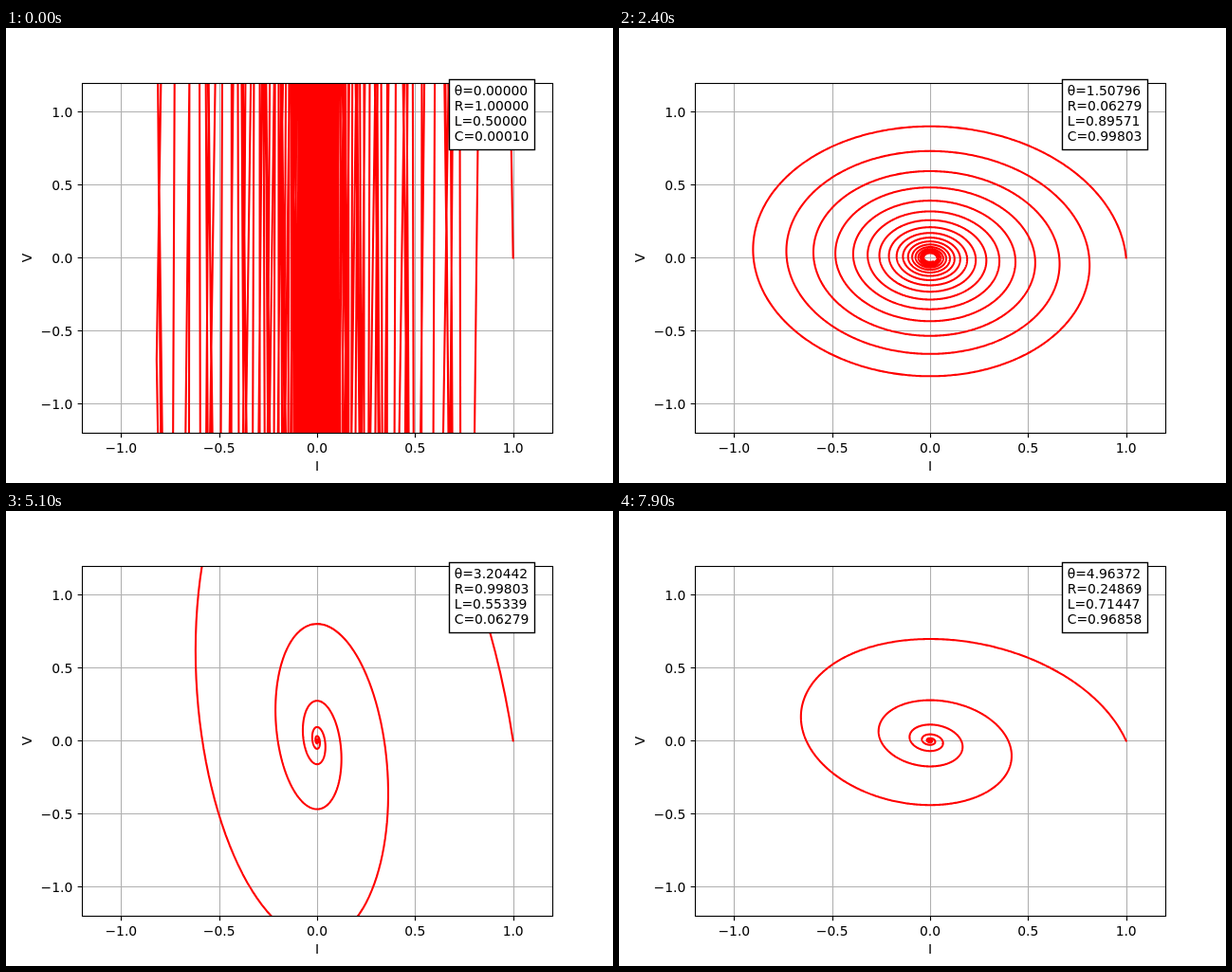
These frames come from a looping animation (640 px wide and 480 px high, 8000 ms). An HTML page:

```html
<!DOCTYPE html>
<html lang="en">
<head>
<meta charset="utf-8">
<title>RLC phase portrait</title>
<style>
  html, body { margin: 0; width: 100%; height: 100%; overflow: hidden; background: #fff; }
  svg { display: block; width: 640px; height: 480px; }
  text { font: 13.889px "DejaVu Sans", sans-serif; fill: #000; white-space: pre; }
  .grid { stroke: #b0b0b0; stroke-width: 1.11; }
  .axis { stroke: #000; stroke-width: 1.11; fill: none; }
  .curve { stroke: #f00; stroke-width: 2.083; fill: none; stroke-linejoin: round; stroke-linecap: square; }
  .box { stroke: #000; stroke-width: 1.39; fill: #fff; }
  .mid { text-anchor: middle; }
  .end { text-anchor: end; }
</style>
</head>
<body>
<svg viewBox="0 0 640 480">
  <clipPath id="plot"><rect x="80" y="58" width="496" height="369"/></clipPath>
  <g id="grid"></g>
  <path id="curve" class="curve" clip-path="url(#plot)"/>
  <g id="axes"><rect class="axis" x="80.5" y="58.5" width="496" height="369"/></g>
  <text class="mid" x="328" y="467">I</text>
  <text class="mid" transform="translate(27 242.4) rotate(-90)">V</text>
  <rect class="box" x="467.5" y="54.5" width="90" height="74"/>
  <g id="info"></g>
</svg>
<script>
const STEP_MS = 100, STEPS = 80;
const SAMPLES = 10000, DT = 100 / (SAMPLES - 1);
const MIN_MOVE = 0.25;

const $ = id => document.getElementById(id);
const px = i => 328 + i * 496 / 2.4;
const py = v => 242.4 - v * 369.6 / 2.4;

function add(parent, tag, attrs, text = '') {
  const el = document.createElementNS('http://www.w3.org/2000/svg', tag);
  for (const k in attrs) el.setAttribute(k, attrs[k]);
  el.textContent = text;
  return parent.appendChild(el);
}

function drawAxes() {
  for (const n of [-1, -0.5, 0, 0.5, 1]) {
    const x = Math.round(px(n)) + 0.5, y = Math.round(py(n)) + 0.5;
    const label = n.toFixed(1).replace('-', '\u2212');
    add($('grid'), 'path', { class: 'grid', d: `M${x} 58V427M80 ${y}H576` });
    add($('axes'), 'path', { class: 'axis', d: `M${x} 427.5v4.86M80.5 ${y}h-4.86` });
    add($('axes'), 'text', { class: 'mid', x: px(n), y: 448 }, label);
    add($('axes'), 'text', { class: 'end', x: 70.3, y: Math.round(py(n) + 5.5) }, label);
  }
}

// Series RLC circuit released from I = 1, V = 0; returns t => [I, V].
function solve(R, L, C) {
  const a = R / (2 * L), d = a * a - 1 / (L * C), w = Math.sqrt(Math.abs(d));
  if (d < 0) return t => {
    const e = Math.exp(-a * t), s = Math.sin(w * t);
    return [e * (Math.cos(w * t) - a / w * s), e * s / (C * w)];
  };
  const p = w - a, q = -w - a;
  return t => {
    const ep = Math.exp(p * t), eq = Math.exp(q * t);
    return [(p * ep - q * eq) / (2 * w), (ep - eq) / (2 * w * C)];
  };
}

function curvePath(R, L, C) {
  const state = solve(R, L, C);
  const points = [];
  let lastX = Infinity, lastY = Infinity;
  for (let n = 0; n < SAMPLES; n++) {
    const [i, v] = state(n * DT);
    const x = px(i), y = py(v);
    if (Math.hypot(x - lastX, y - lastY) < MIN_MOVE) continue;
    points.push(x.toFixed(2) + ' ' + y.toFixed(2));
    lastX = x;
    lastY = y;
  }
  return 'M' + points.join('L');
}

drawAxes();
const lines = [71, 87, 103, 119].map(y => add($('info'), 'text', { x: 472.7, y }));
const size = x => Math.max(Math.abs(x), 1e-4);
let shown = -1;

function tick() {
  const step = Math.floor(performance.now() / STEP_MS) % STEPS;
  if (step !== shown) {
    shown = step;
    const th = step * Math.PI / 50;
    const R = size(Math.cos(th)), L = size(Math.sin(th + Math.PI / 6)), C = size(Math.sin(th));
    $('curve').setAttribute('d', curvePath(R, L, C));
    [th, R, L, C].forEach((value, n) => {
      lines[n].textContent = 'θRLC'[n] + '=' + value.toFixed(5);
    });
  }
  requestAnimationFrame(tick);
}
tick();
</script>
</body>
</html>
```
